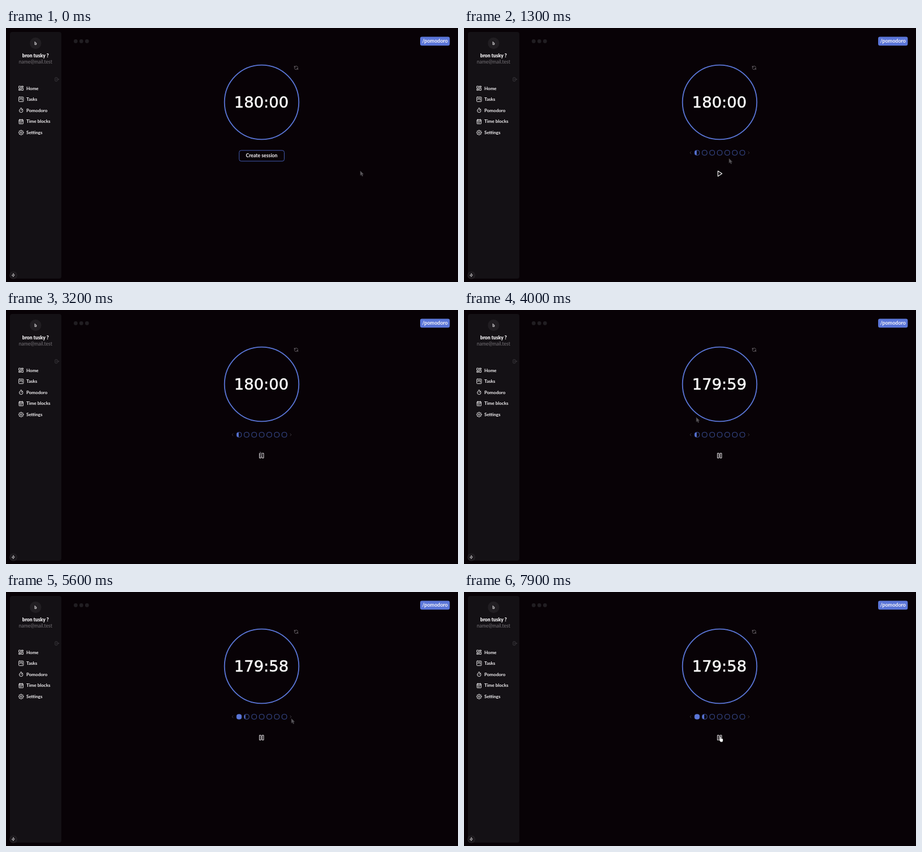
An HTML page with a canvas for the animation above (8000 ms loop, 800x450 px).

```html
<!DOCTYPE html>
<html lang="en">
<head>
<meta charset="utf-8">
<title>Focus timer</title>
<style>
html, body { margin: 0; width: 100%; height: 100%; overflow: hidden; background: #080206; }
canvas { display: block; width: 800px; height: 450px; }
</style>
</head>
<body>
<canvas id="stage"></canvas>
<script>
const canvas = document.getElementById('stage');
const ratio = window.devicePixelRatio || 1;
canvas.width = 800 * ratio;
canvas.height = 450 * ratio;
const ctx = canvas.getContext('2d');

const LOOP = 8000, STEP = 100;
const BLUE = '#5b76d8', BG = '#080206', WHITE = '#f6f4f6';
const CREATE = 1300, PLAY = 2900, TICK_1 = 3900, TICK_2 = 4900;
const NEXT_1 = 5500, NEXT_2 = 6000, PREV = 7100;

// Pointer stops: time, x, y
const stops = [
  [0, 627, 253], [100, 626, 253], [800, 469, 232], [1400, 469, 231],
  [1800, 476, 234], [2200, 438, 249], [2600, 452, 256], [3100, 452, 256],
  [3600, 428, 202], [4000, 411, 190], [4500, 470, 221], [5200, 504, 220],
  [5500, 505, 222], [5600, 505, 224], [5800, 504, 221], [6100, 504, 221],
  [6600, 388, 219], [6700, 382, 217], [7000, 401, 220], [7300, 401, 221],
  [7700, 451, 255], [7900, 453, 256], [8000, 453, 256]
];

// Spans in which the pointer is a hand
const handSpans = [[700, 1300], [2500, 3200], [5100, 5600], [5700, 6200], [6900, 7400], [7600, 8000]];

const icons = {
  home: 'M4 4h6v8h-6z M4 16h6v4h-6z M14 12h6v8h-6z M14 4h6v4h-6z',
  tasks: 'M5 3h14a2 2 0 0 1 2 2v14a2 2 0 0 1-2 2h-14a2 2 0 0 1-2-2v-14a2 2 0 0 1 2-2z M8 7v7 M12 7v4 M16 7v9',
  watch: 'M5 13a7 7 0 1 0 14 0a7 7 0 1 0-14 0 M14.5 10.5L12 13 M17 8l1-1 M14 3h-4',
  calendar: 'M5 5h14a1 1 0 0 1 1 1v14a1 1 0 0 1-1 1h-14a1 1 0 0 1-1-1v-14a1 1 0 0 1 1-1z M4 10h16 M8 3v4 M16 3v4 M8 14h1 M12 14h1 M16 14h0 M8 17h1 M12 17h1',
  logout: 'M14 8v-2a2 2 0 0 0-2-2h-6a2 2 0 0 0-2 2v12a2 2 0 0 0 2 2h6a2 2 0 0 0 2-2v-2 M9 12h12l-3-3 M18 15l3-3',
  refresh: 'M20 11a8.1 8.1 0 0 0-15.5-2 M4 4v5h5 M4 13a8.1 8.1 0 0 0 15.5 2 M20 20v-5h-5',
  bolt: 'M13 3v7h6l-8 11v-7h-6z',
  left: 'M15 6l-6 6l6 6',
  right: 'M9 6l6 6l-6 6',
  play: 'M6 3v18l14-9z',
  pause: 'M4 3h5v18h-5z M14 3h5v18h-5z'
};
icons.gear = gearPath();

function gearPath() {
  let d = '';
  for (let i = 0; i < 48; i++) {
    const a = i * Math.PI / 24;
    const r = 8.3 + 1.3 * Math.tanh(3 * Math.cos(a * 8));
    d += (i ? 'L' : 'M') + (12 + r * Math.cos(a)).toFixed(2) + ' ' + (12 + r * Math.sin(a)).toFixed(2);
  }
  return d + 'z M9 12a3 3 0 1 0 6 0a3 3 0 1 0-6 0';
}

function icon(name, x, y, size, color, width = 2) {
  ctx.save();
  ctx.translate(x - size / 2, y - size / 2);
  ctx.scale(size / 24, size / 24);
  ctx.strokeStyle = color;
  ctx.lineWidth = width;
  ctx.lineCap = ctx.lineJoin = 'round';
  ctx.stroke(new Path2D(icons[name]));
  ctx.restore();
}

function box(x, y, w, h, r) {
  ctx.beginPath();
  ctx.roundRect(x, y, w, h, r);
}

function disc(x, y, r, color) {
  ctx.beginPath();
  ctx.arc(x, y, r, 0, Math.PI * 2);
  ctx.fillStyle = color;
  ctx.fill();
}

function label(text, x, y, size, weight = 700, color = WHITE, align = 'center') {
  ctx.font = `${weight} ${size}px Lato, sans-serif`;
  ctx.fillStyle = color;
  ctx.textAlign = align;
  ctx.fillText(text, x, y);
}

const clamp = v => Math.max(0, Math.min(1, v));
const within = (t, spans) => spans.some(([a, b]) => t >= a && t < b);

function pointerAt(t) {
  const i = Math.max(1, stops.findIndex(s => s[0] >= t));
  const [t0, x0, y0] = stops[i - 1], [t1, x1, y1] = stops[i];
  const p = clamp((t - t0) / (t1 - t0));
  const e = p * p * (3 - 2 * p);
  return [x0 + (x1 - x0) * e, y0 + (y1 - y0) * e];
}

function drawSidebar() {
  box(7, 7, 91, 437, 4);
  ctx.fillStyle = '#141115';
  ctx.fill();
  disc(52.3, 27, 10.2, '#211e22');
  label('b', 52.3, 29.7, 7.6);
  label('bron tusky ?', 52.3, 52, 8.5, 900);
  label('name@mail.test', 52.3, 63.3, 8.5, 400, '#777378');
  icon('logout', 90, 91, 9.5, '#454247');

  [['home', 'Home'], ['tasks', 'Tasks'], ['watch', 'Pomodoro'], ['calendar', 'Time blocks'], ['gear', 'Settings']]
    .forEach(([name, text], i) => {
      const y = 106.7 + i * 19.65;
      icon(name, 26.7, y, 11, WHITE);
      label(text, 36, y + 2.8, 8, 700, WHITE, 'left');
    });

  disc(13, 438, 6.6, '#302d31');
  disc(13, 438, 6, '#1b181c');
  icon('bolt', 13, 438, 7.5, WHITE, 2.2);
}

function drawTimer(t) {
  ctx.beginPath();
  ctx.arc(452.5, 131.5, 65.8, 0, Math.PI * 2);
  ctx.strokeStyle = BLUE;
  ctx.lineWidth = 1.8;
  ctx.stroke();
  icon('refresh', 513.5, 70.5, 9.5, '#767277');

  const text = t < TICK_1 ? '180:00' : t < TICK_2 ? '179:59' : '179:58';
  ctx.font = '27.4px "DejaVu Sans", sans-serif';
  ctx.textAlign = 'center';
  ctx.fillStyle = ctx.strokeStyle = '#fff';
  ctx.lineWidth = 0.5;
  ctx.fillText(text, 452, 141);
  ctx.strokeText(text, 452, 141);
}

function drawButton(t) {
  box(412.7, 216.9, 79.8, 19, 3.5);
  ctx.globalAlpha = clamp((t - 600) / 200);
  ctx.fillStyle = BLUE;
  ctx.fill();
  ctx.globalAlpha = 1;
  ctx.strokeStyle = '#4a66c4';
  ctx.lineWidth = 0.9;
  ctx.stroke();
  label('Create session', 452.5, 229, 8.7);
}

function progressAt(t) {
  if (t < NEXT_1) return [0, 0.42];
  if (t < NEXT_2) return [1, 0.24 + 0.18 * clamp((t - NEXT_1 - 100) / 200)];
  if (t < PREV) return [2, 0.32];
  return [1, 0.42];
}

function drawSessions(t) {
  const [done, part] = progressAt(t);
  icon('left', 401, 221, 8, '#555157');
  icon('right', 504, 221, 8, '#555157');
  for (let i = 0; i < 7; i++) {
    const x = 408.2 + i * 13.36, y = 216.7, s = 8.6;
    const fill = i < done ? 1 : i === done ? part : 0;
    if (fill) {
      ctx.save();
      box(x, y, s, s, 3.5);
      ctx.clip();
      ctx.fillStyle = BLUE;
      ctx.fillRect(x, y, s * fill, s);
      ctx.restore();
    }
    box(x, y, s, s, 3.3);
    ctx.strokeStyle = fill === 1 ? BLUE : '#435cae';
    ctx.lineWidth = 0.9;
    ctx.stroke();
  }
  if (t < PLAY) icon('play', 452.5, 258, 12.5, WHITE, 2.2);
  else icon('pause', 452.7, 258, 11.2, WHITE, 2.1);
}

function drawPointer(t) {
  const [x, y] = pointerAt(t);
  ctx.save();
  ctx.translate(x, y);
  ctx.lineJoin = 'round';
  ctx.lineWidth = 0.7;
  if (within(t, handSpans)) {
    const hand = new Path2D('M0 1q0-1 .8-1t.8 1v2.6l2.6.5q1 .2 1 1.2v1.8l-.8 2.3h-3.3l-2.2-3q-.8-1.3.1-1.4l1 .7z');
    ctx.fillStyle = '#fff';
    ctx.strokeStyle = '#111';
    ctx.stroke(hand);
    ctx.fill(hand);
  } else {
    const arrow = new Path2D('M0 0v8.5l1.9-1.7l1.4 3l1.6-.7l-1.3-3h2.5z');
    ctx.fillStyle = '#5a575b';
    ctx.strokeStyle = '#29262a';
    ctx.fill(arrow);
    ctx.stroke(arrow);
  }
  ctx.restore();
}

function draw(t) {
  ctx.setTransform(ratio, 0, 0, ratio, 0, 0);
  ctx.fillStyle = BG;
  ctx.fillRect(0, 0, 800, 450);
  drawSidebar();
  for (let i = 0; i < 3; i++) disc(123.3 + i * 10, 23.4, 3.4, '#211e22');
  box(733, 15.5, 52.4, 15.7, 3.2);
  ctx.fillStyle = BLUE;
  ctx.fill();
  label('/pomodoro', 759.2, 26.2, 9);
  drawTimer(t);
  if (t < CREATE) drawButton(t);
  else drawSessions(t);
  drawPointer(t);
}

const start = performance.now();
function loop() {
  const t = (performance.now() - start) % LOOP;
  draw(Math.floor(t / STEP) * STEP);
  requestAnimationFrame(loop);
}
loop();
</script>
</body>
</html>
```
